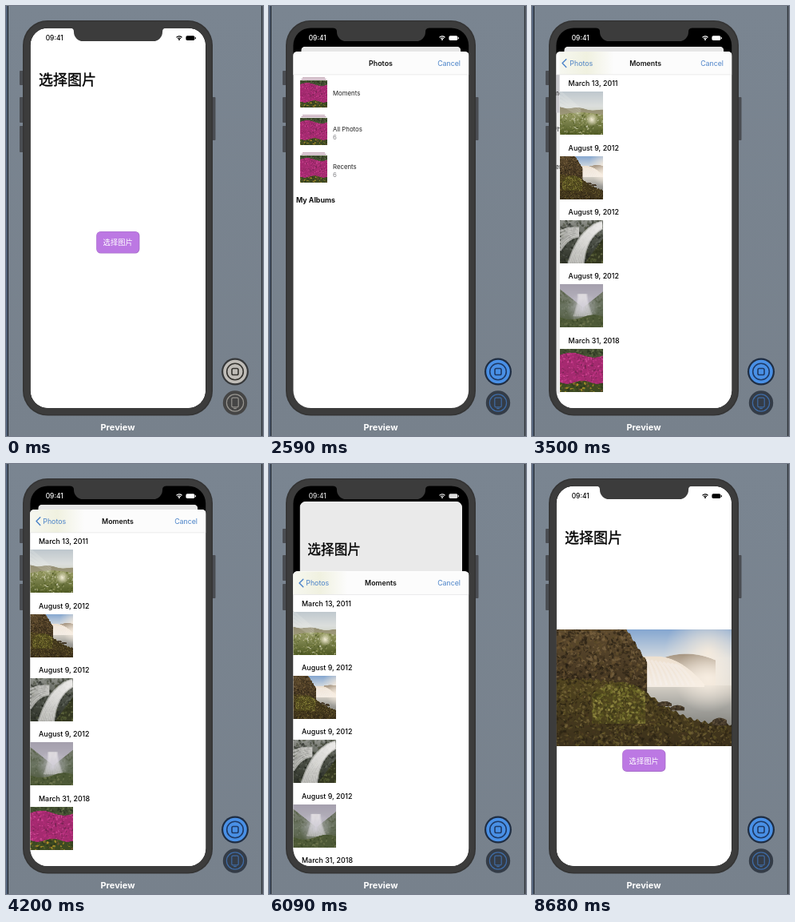
Recreate the animation shown at these times as an HTML page with a canvas. Size 322 px wide and 538 px high, loop 8.75 s.

```html
<!DOCTYPE html>
<html lang="zh">
<head>
<meta charset="utf-8">
<title>选择图片</title>
<style>
html, body { margin: 0; width: 100%; height: 100%; overflow: hidden; background: #78828d; }
canvas { display: block; width: 322px; height: 538px; }
</style>
</head>
<body>
<canvas id="stage"></canvas>
<script>
const W = 322, H = 538, LOOP = 8750;
const LIVE_AT = 70, OPEN_AT = 1585, LIST_AT = 2030, TAP_AT = 3150, PUSH_AT = 3185, CLOSE_AT = 6050;
const LEFT = 30.4, TOP = 27.4, WIDTH = 219.8, HEIGHT = 475.7;
const SHEET = 57, BAR = 29, THUMB = 54;
const LATIN = 'Inter, "Open Sans", sans-serif';
const CJK = '"Noto Sans CJK SC", "Noto Sans CJK", sans-serif';
const BLUE = '#4a82c8';

const stage = document.getElementById('stage');
const ratio = window.devicePixelRatio || 1;
stage.width = W * ratio;
stage.height = H * ratio;
const g = stage.getContext('2d');

const clamp = v => Math.max(0, Math.min(1, v));
const lerp = (a, b, k) => a + (b - a) * k;

// Critically damped spring, 0 to 1
function spring(ms) {
  const x = Math.max(0, ms) * 0.0183;
  return 1 - (1 + x) * Math.exp(-x);
}

function rng(seed) {
  return () => (seed = (seed * 16807) % 2147483647) / 2147483647;
}

function rect(x, y, w, h, fill) {
  g.fillStyle = fill;
  g.fillRect(x, y, w, h);
}

function box(x, y, w, h, r, fill) {
  g.beginPath();
  g.roundRect(x, y, w, h, r);
  if (fill) { g.fillStyle = fill; g.fill(); }
}

function circle(x, y, r, fill, line) {
  g.beginPath();
  g.arc(x, y, r, 0, 7);
  if (fill) { g.fillStyle = fill; g.fill(); }
  if (line) { g.strokeStyle = line; g.stroke(); }
}

function text(str, x, y, size, weight, color, align = 'left', family = LATIN) {
  g.font = `${weight} ${size}px ${family}`;
  g.textAlign = align;
  g.fillStyle = color;
  g.fillText(str, x, y);
}

// ---- Pictures ----

function picture(w, h, paint) {
  const c = document.createElement('canvas');
  c.width = w * 2;
  c.height = h * 2;
  const p = c.getContext('2d');
  p.scale(2, 2);
  paint(p, w, h);
  return c;
}

function fade(c, y0, y1, ...colors) {
  const f = c.createLinearGradient(0, y0, 0, y1);
  colors.forEach((col, i) => f.addColorStop(i / (colors.length - 1), col));
  return f;
}

function wash(c, w, h, ...colors) {
  c.fillStyle = fade(c, 0, h, ...colors);
  c.fillRect(0, 0, w, h);
}

function glow(c, x, y, r, rgb, alpha) {
  const f = c.createRadialGradient(x, y, 0, x, y, r);
  f.addColorStop(0, `rgba(${rgb},${alpha})`);
  f.addColorStop(1, `rgba(${rgb},0)`);
  c.fillStyle = f;
  c.fillRect(x - r, y - r, r * 2, r * 2);
}

// Fills the area under top(x) and scatters soft grain of the given colours over it
function land(c, x0, x1, bottom, top, fill, grain, ...colors) {
  c.save();
  c.beginPath();
  c.moveTo(x0, bottom);
  for (let x = x0; x <= x1; x++) c.lineTo(x, top(x));
  c.lineTo(x1, bottom);
  c.fillStyle = fill;
  c.fill();
  c.clip();
  const r = rng(Math.round(x1 * 7 + bottom));
  c.globalAlpha = 0.55;
  for (let i = 0; colors.length && i < (x1 - x0) * bottom * 0.25 / grain; i++) {
    c.fillStyle = colors[Math.floor(r() * colors.length)];
    c.beginPath();
    c.ellipse(lerp(x0, x1, r()), bottom * r(), grain * (0.3 + r()), grain * (0.2 + r() * 0.6), r() * 3, 0, 7);
    c.fill();
  }
  c.restore();
}

// A bundle of pale strands from one line to another
function strands(c, n, alpha, path) {
  c.strokeStyle = `rgba(246,244,242,${alpha})`;
  c.lineWidth = 3;
  for (let i = 0; i < n; i++) {
    const [x0, y0, cx, cy, x1, y1] = path(i / (n - 1));
    c.beginPath();
    c.moveTo(x0, y0);
    c.quadraticCurveTo(cx, cy, x1, y1);
    c.stroke();
  }
}

const bay = picture(220, 146, (c, w, h) => {
  wash(c, w, h, '#84a6d0', '#d3dae0', '#dedad2', '#8f8f8a', '#80807b');
  glow(c, 190, 30, 55, '248,236,220', 0.9);
  land(c, 115, 200, 72, x => 31 + ((x - 163) / 13) ** 2, fade(c, 30, 60, '#a3927e', '#e6dccf'), 3);
  c.fillStyle = fade(c, 68, 125, '#d9d3c9', '#a6a5a0', '#82827d');
  c.fillRect(90, 70, 130, 76);
  land(c, 106, 186, 72, x => 34 + (Math.max(0, x - 125) / 60) ** 2 * 34, fade(c, 34, 72, '#eee0cf', '#f4ece3'), 3);
  strands(c, 9, 0.35, k => [109 + k * 40, 37 + k * 7, 115 + k * 46, 48, 118 + k * 55, 70]);
  glow(c, 190, 62, 42, '250,240,228', 0.85);
  land(c, 0, 114, 100, x => (x - 88) * 1.6 + Math.sin(x) * 1.5, fade(c, 0, 90, '#5d4a2e', '#3c2f1d'), 2.4,
    '#2a2114', '#6f5833', '#3a2d1b', '#5b4c28', '#87704a', '#1f1a12');
  land(c, 0, 220, 146, x => 62 + 58 / (1 + Math.exp((130 - x) / 22)) + Math.sin(x * 0.7) * 1.5,
    fade(c, 60, 146, '#51451f', '#3c311c'), 2.2,
    '#2a2112', '#584a24', '#6b5f2b', '#453620', '#837140', '#241e12');
  land(c, 45, 112, 118, x => 66 + ((x - 80) / 9) ** 2, 'rgba(90,85,32,.4)', 2.2,
    '#7d7a30', '#5b5a20', '#a29a4c', '#3d3a18');
  for (const x of [136, 152, 205]) {
    land(c, x - 9, x + 9, 96 + (x - 136) * 0.35, v => 90 + (x - 136) * 0.3 + ((v - x) / 5) ** 2, '#44392a', 2, '#6a5a43', '#2c251c');
  }
});

const meadow = picture(THUMB, THUMB, (c, w, h) => {
  wash(c, w, h, '#bfc8ce', '#dcdfdd', '#c9c9ac', '#6d7440');
  land(c, 0, w, h, x => 19 + x * 0.08 + Math.sin(x / 5), fade(c, 18, 36, '#918a70', '#a7a581'), 2);
  land(c, 0, w, h, x => 29 - Math.sin(x / 17) * 3, fade(c, 26, h, '#9a9e68', '#4f5a24'), 1.3,
    '#66702f', '#8c934f', '#424d1d', '#b3b27c', '#e4e2cc');
  strands(c, 4, 0.16, k => [0, k * 15, 12, 10 + k * 12, 26, 22 + k * 8]);
  glow(c, 40, 35, 8, '250,244,222', 0.95);
});

const stream = picture(THUMB, THUMB, (c, w, h) => {
  land(c, 0, w, h, () => 0, fade(c, 0, h, '#91938d', '#4a4e45', '#2f3328'), 2.2,
    '#2d312b', '#646960', '#474d3a', '#20241d');
  strands(c, 6, 0.55, k => [0, 14 + k * 24, 10, 9 + k * 12, 24, 10 + k * 10]);
  strands(c, 9, 0.6, k => [53, 2 + k * 8, 24 + k * 8, 10 + k * 12, 11 + k * 18, h]);
  land(c, 32, w, h, x => 54 - (x - 31) * 1.35, '#353922', 2, '#5e6639', '#282c19', '#7b8054');
});

const gorge = picture(THUMB, THUMB, (c, w, h) => {
  wash(c, w, h, '#a5a0ae', '#b3afba', '#878b87', '#525c44');
  land(c, 0, w, h, x => 29 - Math.abs(x - 29) * 0.8, fade(c, 6, h, '#7d8175', '#66705c', '#4c5639'), 2,
    '#616a55', '#7d8372', '#525c44');
  strands(c, 10, 0.35, k => [23 + k * 10, 12, 24 + k * 9, 22, 18 + k * 22, 40]);
  glow(c, 28, 30, 20, '214,210,224', 0.75);
  land(c, 0, w, h, x => 41 + Math.sin(x / 9) * 3, '#4d5936', 1.6, '#616b42', '#384425', '#7a8158');
});

const flowers = picture(THUMB, THUMB, (c, w, h) => {
  land(c, 0, w, h, () => 0, '#424e31', 2, '#59663f', '#2a3421', '#6f7b52');
  land(c, 0, w, 46, x => 8 - Math.sin(x / 9) * 3, '#a52a70', 1.5,
    '#d03c92', '#e75aaa', '#8c2560', '#5e2444', '#c0307f');
  land(c, 0, w, h, x => 42 + Math.sin(x / 6) * 2, '#3e4a22', 1.6, '#67762f', '#27321a', '#e3b52a', '#8a5a38');
});

const moments = [
  ['March 13, 2011', meadow], ['August 9, 2012', bay], ['August 9, 2012', stream],
  ['August 9, 2012', gorge], ['March 31, 2018', flowers]
];

function drawSquare(img, x, y, size) {
  const s = Math.min(img.width, img.height);
  g.drawImage(img, (img.width - s) / 2, (img.height - s) / 2, s, s, x, y, size, size);
}

// ---- Surroundings ----

function drawDesk() {
  rect(0, 0, W, H, fade(g, 0, H, '#7a8591', '#77818c'));
  rect(0, 0, 2, H, '#53637a');
  rect(2, 0, 1, H, '#1d2229');
  rect(319.8, 0, 1.6, H, '#30343a');
  for (const [y, h] of [[81, 18], [114, 32], [150, 33]]) box(17, y, 4.5, h, 1, '#4a4d52');
  box(258, 114, 4.5, 54, 1, '#4a4d52');
  box(21, 18, 238, 494.5, 31, '#343434');
  box(22.5, 19.5, 235, 491.5, 30, '#3c3c3c');
  text('Preview', 140, 531.3, 11, 700, '#fff', 'center');
}

function drawControls(live) {
  const dark = live ? '#1f3a66' : '#34332f';
  const line = live ? '#3f6ba4' : '#96948f';
  circle(287, 457.5, 17, live ? '#1f2d42' : '#36383a');
  circle(287, 457.5, 14.8, live ? '#4990e6' : '#c0bdb8');
  g.lineWidth = 1.6;
  circle(287, 457.5, 10.3, null, dark);
  box(283, 453.5, 8, 8, 1.8);
  g.stroke();

  circle(287, 496.5, 15.2, live ? '#343c47' : '#454545');
  g.lineWidth = 1.2;
  circle(287, 496.5, 10.6, null, line);
  box(282.8, 490.2, 8.4, 11.6, 1.6);
  g.stroke();
  rect(285.2, 503, 3.6, 1.2, line);
}

function drawNotch() {
  box(85, 20, 111, 24, 11.5, '#3c3c3c');
  for (const side of [-1, 1]) {
    const x = 140.5 + side * 55.5;
    g.beginPath();
    g.moveTo(x - side * 2, 26);
    g.lineTo(x + side * 5, TOP);
    g.quadraticCurveTo(x, TOP, x, 32);
    g.lineTo(x - side * 2, 32);
    g.fill();
  }
}

function drawStatus(light) {
  const v = Math.round(255 * light);
  const color = `rgb(${v},${v},${v})`;
  text('09:41', 60.7, 43.2, 8.4, 500, color, 'center');
  g.strokeStyle = color;
  g.lineCap = 'butt';
  g.lineWidth = 1.2;
  for (const r of [2.6, 4.8]) {
    g.beginPath();
    g.arc(217, 42.7, r, -Math.PI * 0.76, -Math.PI * 0.24);
    g.stroke();
  }
  circle(217, 42, 1, color);
  box(225.4, 37.2, 11, 5.8, 1.7, color);
  box(237, 39, 1, 2.2, 0.5, color);
}

// ---- App ----

function drawHome(picked) {
  rect(LEFT, TOP, WIDTH, HEIGHT, '#fff');
  text('选择图片', 41, 98.5, 18, 500, '#000', 'left', CJK);
  g.strokeStyle = '#000';
  g.lineWidth = 0.35;
  g.strokeText('选择图片', 41, 98.5);
  if (picked) g.drawImage(bay, LEFT, 206.5, WIDTH, 146.5);
  const y = picked ? 357.3 : 282;
  box(113.2, y, 54.2, 27.6, 5.5, '#a86fca');
  box(113.7, y + 0.4, 52.8, 26.4, 5, '#bc78e3');
  text('选择图片', 140.2, y + 17.4, 9.3, 400, '#fff', 'center', CJK);
}

function drawAlbums(pressed) {
  const top = SHEET + BAR, row = 47;
  if (pressed) rect(30, top, WIDTH, row + 0.5, '#dcdbe0');
  ['Moments', 'All Photos', 'Recents'].forEach((name, i) => {
    const y = top + i * row;
    rect(42, y + 3.3, 28, 1, '#b18aa0');
    rect(40.5, y + 5.2, 31, 1, '#b18aa0');
    drawSquare(flowers, 39, y + 7, 34);
    text(name, 80, y + (i ? 24 : 26), 7.8, 400, '#222');
    if (i) text('6', 80, y + 34, 7.8, 400, '#8a8a8e');
  });
  text('My Albums', 83, 246.3, 8.9, 700, '#111', 'right');
}

function drawMoments() {
  rect(30, SHEET, WIDTH + 1, HEIGHT, '#fff');
  moments.forEach(([date, img], i) => {
    const y = 107.3 + i * 80.35;
    text(date, 41, y - 7, 8.9, 500, '#000');
    drawSquare(img, LEFT, y, THUMB);
  });
}

function drawBar(q, dx) {
  rect(30, SHEET, WIDTH + 1, BAR, '#fcfcfc');
  if (q > 0) {
    const tint = g.createLinearGradient(30 + dx, 0, 98 + dx, 0);
    ['#f6f7f0', '#f0f1e0', '#fcfcfc'].forEach((col, i) => tint.addColorStop(i / 2, col));
    rect(30 + dx, SHEET, 68, BAR, tint);
  }
  rect(30, SHEET + BAR - 0.4, WIDTH + 1, 0.6, '#dededf');

  const y = 74.8, late = q ** 3;
  const mid = 140 - 79.3 * lerp(q * 0.8, 1, late);
  g.globalAlpha = 1 - late;
  text('Photos', mid, y, 8.9, 600, q > 0 ? '#55525f' : '#111', 'center');
  g.globalAlpha = late;
  text('Photos', mid, y, 8.8, 400, BLUE, 'center');
  g.globalAlpha = q;
  text('Moments', 140 + dx * 0.46, y, 8.8, 600, '#111', 'center');
  g.strokeStyle = late > 0.8 ? BLUE : '#7c86a8';
  g.lineWidth = 1.4;
  g.lineCap = g.lineJoin = 'round';
  g.beginPath();
  g.moveTo(42.8, 66.8);
  g.lineTo(38, 71.6);
  g.lineTo(42.8, 76.4);
  g.stroke();
  g.globalAlpha = 1 - q * (1 - q);
  text('Cancel', 240, y, 8.8, 400, BLUE, 'right');
  g.globalAlpha = 1;
}

function drawSheet(t, p) {
  g.save();
  g.translate(0, 446 * (1 - p));
  box(30, SHEET, WIDTH + 1, 470, [5.5, 5.5, 0, 0], '#fff');
  g.clip();
  if (t >= LIST_AT) {
    const q = spring(t - PUSH_AT);
    const dx = 220 * (1 - q);
    g.save();
    g.translate(-66 * q, 0);
    drawAlbums(t >= TAP_AT);
    g.restore();
    rect(30, SHEET + BAR, WIDTH, 399, `rgba(0,0,0,${0.08 * q})`);
    if (q > 0) {
      g.save();
      g.translate(dx, 0);
      drawMoments();
      g.restore();
    }
    drawBar(q, dx);
  }
  g.restore();
}

function drawScreen(t) {
  const closing = t >= CLOSE_AT;
  const age = t - (closing ? CLOSE_AT : OPEN_AT);
  const p = closing ? 1 - spring(age) : spring(age);
  const light = closing ? 1 - clamp(age / 320) : clamp(age / 320);
  g.save();
  box(LEFT, TOP, WIDTH, HEIGHT, 22, '#000');
  g.clip();

  g.save();
  const s = 1 - 0.09 * p;
  g.translate(140, TOP + 23.4 * p);
  g.scale(s, s);
  g.translate(-140, -TOP);
  box(LEFT, TOP, WIDTH, HEIGHT, lerp(22, 5.5, p));
  g.clip();
  drawHome(closing);
  rect(LEFT, TOP, WIDTH, HEIGHT, `rgba(8,0,4,${0.1 * p})`);
  g.restore();

  if (p > 0.002) drawSheet(t, p);
  g.restore();
  drawNotch();
  drawStatus(light);
}

const start = performance.now();

function frame() {
  const t = (performance.now() - start) % LOOP;
  g.setTransform(ratio, 0, 0, ratio, 0, 0);
  drawDesk();
  drawScreen(t);
  drawControls(t >= LIVE_AT);
  requestAnimationFrame(frame);
}

frame();
</script>
</body>
</html>
```
